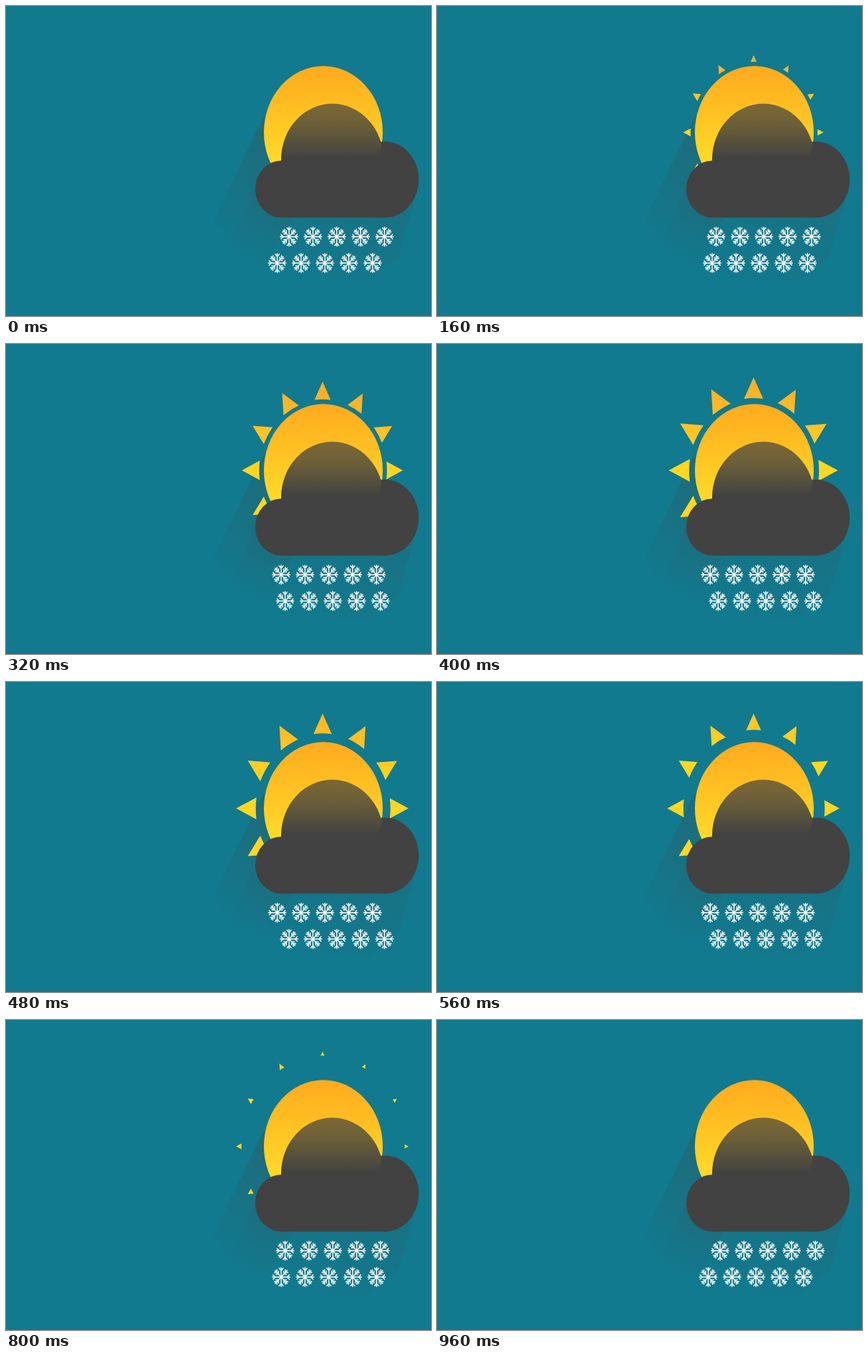
These frames come from a looping animation (590x430 px, 1000 ms). An HTML page:

```html
<!DOCTYPE html>
<html lang="en">
<head>
<meta charset="utf-8">
<title>Sun, cloud and snow</title>
<style>
  html, body { margin: 0; width: 100%; height: 100%; overflow: hidden; background: #117a8f; }
  svg { display: block; }
</style>
</head>
<body>
<svg width="590" height="430" viewBox="0 0 590 430">
  <defs>
    <linearGradient id="sunFill" gradientUnits="userSpaceOnUse" x1="0" y1="83" x2="0" y2="222">
      <stop offset="0" stop-color="#ffaa1e"/>
      <stop offset="1" stop-color="#ffdc28"/>
    </linearGradient>
    <linearGradient id="domeFill" gradientUnits="userSpaceOnUse" x1="0" y1="135" x2="0" y2="211">
      <stop offset="0" stop-color="#7d6836"/>
      <stop offset=".4" stop-color="#6b5f38"/>
      <stop offset="1" stop-color="#424242"/>
    </linearGradient>
    <linearGradient id="rayFill" gradientUnits="userSpaceOnUse" x1="0" y1="-95" x2="0" y2="5">
      <stop offset="0" stop-color="#fcb028"/>
      <stop offset="1" stop-color="#ffd622"/>
    </linearGradient>
    <linearGradient id="sunShade" gradientUnits="userSpaceOnUse" x1="375" y1="180" x2="300" y2="337">
      <stop offset="0" stop-color="#424242" stop-opacity=".26"/>
      <stop offset="1" stop-color="#424242" stop-opacity="0"/>
    </linearGradient>
    <linearGradient id="cloudShade" gradientUnits="userSpaceOnUse" x1="470" y1="260" x2="420" y2="388">
      <stop offset="0" stop-color="#424242" stop-opacity=".14"/>
      <stop offset="1" stop-color="#424242" stop-opacity="0"/>
    </linearGradient>
    <clipPath id="sunClip"><ellipse cx="440.5" cy="175.2" rx="82.5" ry="92"/></clipPath>
    <path id="flake" fill="none" stroke="#fff" stroke-width="1.35"/>
  </defs>
  <rect width="590" height="430" fill="#117a8f"/>
  <path d="M357 155L288 297L310 335L350 370L400 293V155Z" fill="url(#sunShade)"/>
  <path d="M347 250L312 330L355 370L430 382H500L545 348L572 250Z" fill="url(#cloudShade)"/>
  <path id="rays" fill="url(#rayFill)" transform="translate(439.5 175.3) scale(1 1.104)"/>
  <ellipse cx="440.5" cy="175.2" rx="82.5" ry="92" fill="url(#sunFill)"/>
  <g fill="#424242">
    <ellipse cx="526" cy="240.7" rx="47" ry="52.7"/>
    <ellipse cx="453" cy="212.6" rx="71" ry="77" fill="url(#domeFill)" clip-path="url(#sunClip)"/>
    <ellipse cx="382" cy="253.9" rx="36" ry="39.5"/>
    <path d="M382 210H527V293.4H382Z"/>
  </g>
  <g id="upper"></g>
  <g id="lower"></g>
</svg>
<script>
const LOOP = 1000, STEP = 40, HALF = 480, SWAY = 16.5;
const el = id => document.getElementById(id);
const clamp = v => Math.min(1, Math.max(0, v));
const ease = v => { v = clamp(v); return v * v * (3 - 2 * v); };

// Polar point, angle in degrees clockwise from the top; side shifts across the ray.
function polar(angle, r, side = 0) {
  const a = angle * Math.PI / 180, s = Math.sin(a), c = Math.cos(a);
  return `${(r * s + side * c).toFixed(2)} ${(side * s - r * c).toFixed(2)}`;
}

function flakePath() {
  let d = "";
  for (let i = 0; i < 8; i++) {
    const a = i * 45, long = i % 2 === 0;
    const forks = long ? [[8.2, 11.6, 3.2]] : [[5.2, 8.2, 3], [8.4, 11.2, 2.8]];
    d += `M0 0L${polar(a, long ? 12.7 : 12.3)}`;
    for (const [from, to, w] of forks)
      d += `M${polar(a, to, -w)}L${polar(a, from)}L${polar(a, to, w)}`;
  }
  return d;
}

function fillRow(id, y) {
  for (let i = 0; i < 5; i++) {
    const use = document.createElementNS("http://www.w3.org/2000/svg", "use");
    use.setAttribute("href", "#flake");
    use.setAttribute("transform", `translate(${376.5 + i * 33.1} ${y}) scale(1 1.09)`);
    el(id).append(use);
  }
}

// The rays on the left are slightly larger.
function ray(angle, grow, fade) {
  const size = grow - fade;
  if (size < 0.01) return "";
  const extra = (angle < 0 ? 2.7 : 0.6) * clamp(size * 8);
  const tip = 89 + 30 * grow + extra * 0.35, base = tip - 30 * size - extra;
  const w = (tip - base) * 0.49;
  return `M${polar(angle, tip)}L${polar(angle, base, w)}` +
    `Q${polar(angle, base + 2 * size)} ${polar(angle, base, -w)}Z`;
}

function draw(time) {
  const t = Math.floor((time % LOOP) / STEP) * STEP;
  const grow = ease(t / HALF), fade = ease((t - 320) / 640);
  let d = "";
  for (let a = -120; a <= 90; a += 30) d += ray(a, grow, fade);
  el("rays").setAttribute("d", d);
  el("rayFill").setAttribute("gradientTransform", `translate(0 ${-220 * fade})`);

  const sway = SWAY * clamp(Math.abs(t - HALF) / HALF);
  el("upper").setAttribute("transform", `translate(${sway} 0)`);
  el("lower").setAttribute("transform", `translate(${SWAY - sway} 0)`);
}

el("flake").setAttribute("d", flakePath());
fillRow("upper", 320);
fillRow("lower", 356.5);
const start = performance.now();
function tick() {
  draw(performance.now() - start);
  requestAnimationFrame(tick);
}
tick();
</script>
</body>
</html>
```
